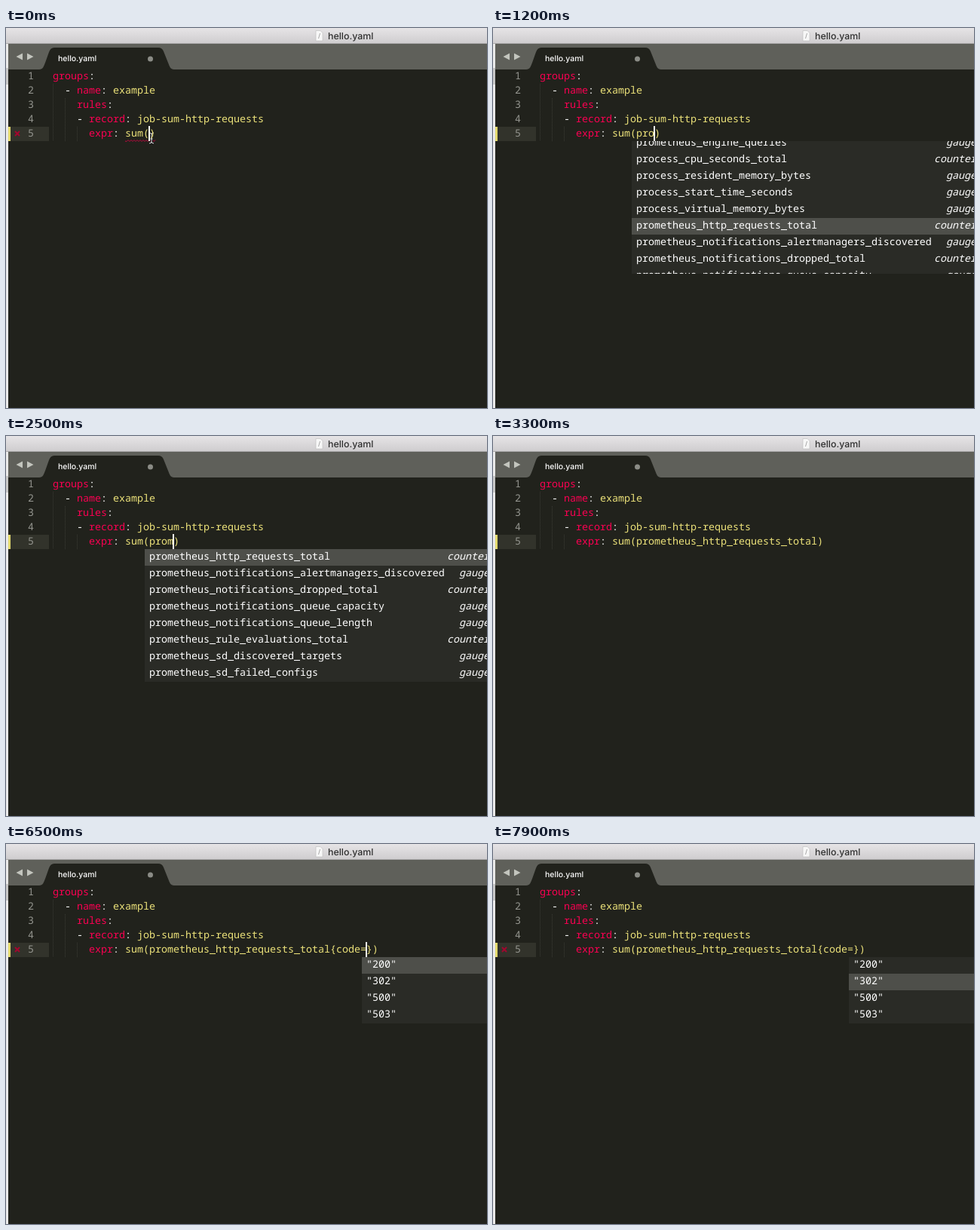
These frames come from a looping animation (638 px wide and 504 px high, 8 s). An HTML page:

```html
<!DOCTYPE html>
<html lang="en">
<head>
<meta charset="utf-8">
<title>hello.yaml</title>
<style>
  html, body { margin: 0; width: 100%; height: 100%; overflow: hidden; background: #21221c; }
  svg { display: block; width: 638px; height: 504px; }
  text { white-space: pre; text-rendering: geometricPrecision; }
  .code { font: 500 13.333px "Noto Sans Mono", "DejaVu Sans Mono", monospace; fill: #ece27a; }
  .ui { font-family: Inter, Roboto, sans-serif; font-weight: 500; }
  .key { fill: #fa0052; }
  .mark, .item { fill: #fff; }
  .num { fill: #94958f; text-anchor: end; }
  .kind { font-style: italic; fill: #fff; text-anchor: end; }
  .guide { stroke: #3a3b34; stroke-dasharray: 1 1; }
</style>
</head>
<body>
<svg viewBox="0 0 638 504">
  <defs>
    <linearGradient id="bar" x2="0" y2="1">
      <stop stop-color="#e6e4e6"/><stop offset="1" stop-color="#cfcdcf"/>
    </linearGradient>
    <clipPath id="clip"><path d="M0 150H638V326H0z"/></clipPath>
  </defs>
  <path fill="#21221c" d="M0 0H638V504H0z"/>
  <path fill="#e9e9e9" d="M0 20H3V504H0z"/>
  <path fill="#c6c6c6" d="M0 53H3V75H0z"/>
  <path fill="#5f605a" d="M3 21H638V55H3z"/>
  <path fill="url(#bar)" d="M0 0H638V20H0z"/>
  <path fill="#a9a8a9" d="M0 20H638V21H0z"/>
  <path fill="#21221c" d="M44 55C49 55 50 51 52 46L57 32Q59 26 64 26H202Q207 26 209 31L215 46C217 51 218 55 223 55z"/>
  <path fill="#c3c5be" d="M22 33.5V42.5L13.5 38zM28 33.5V42.5L36.5 38z"/>
  <circle cx="191.5" cy="41" r="3.5" fill="#8b8c86"/>
  <text class="ui" x="69" y="44" font-size="10.5" fill="#fff">hello.yaml</text>
  <path fill="#f7f7f7" stroke="#bcbcbc" stroke-width=".6" d="M411 3.5H417L420 6.5V17H411z"/>
  <path stroke="#aaa" d="M416.5 7L414.5 14"/>
  <text class="ui" x="427" y="15" font-size="12.4" fill="#303030">hello.yaml</text>
  <path fill="#32332b" d="M6 131H57V150H6z"/>
  <path fill="#e2d96c" d="M3 131H6V150H3z"/>
  <path class="guide" d="M62.5 74V150M78.5 93V150M94.5 131V150"/>
  <g id="lines"></g>
  <g id="live"></g>
</svg>
<script>
const LOOP = 8000, CHAR = 8, ROW = 22, LIST_Y = 150;
const $ = id => document.getElementById(id);
const text = (x, y, cls, s) => `<text class="code ${cls}" x="${x}" y="${y}">${s}</text>`;
const rect = (x, y, w, h, fill) => `<rect x="${x}" y="${y}" width="${w}" height="${h}" fill="${fill}"/>`;
const lineY = n => 49 + 19 * n;

// indent column, dash, key, value
const yaml = [
  [0, '', 'groups', ''],
  [2, '- ', 'name', ' example'],
  [4, '', 'rules', ''],
  [4, '- ', 'record', ' job-sum-http-requests'],
  [6, '', 'expr', ''],
];
$('lines').innerHTML = yaml.map(([col, dash, key, value], i) =>
  text(37, lineY(i + 1), 'num', i + 1) +
  text(62 + col * CHAR, lineY(i + 1), '',
    `<tspan class="mark">${dash}</tspan><tspan class="key">${key}</tspan><tspan class="mark">:</tspan>${value}`)
).join('');

const gauge = name => [name, 'gauge'], counter = name => [name, 'counter'];
const prom = [
  counter('prometheus_http_requests_total'),
  gauge('prometheus_notifications_alertmanagers_discovered'),
  counter('prometheus_notifications_dropped_total'),
  gauge('prometheus_notifications_queue_capacity'),
  gauge('prometheus_notifications_queue_length'),
  counter('prometheus_rule_evaluations_total'),
  gauge('prometheus_sd_discovered_targets'),
  gauge('prometheus_sd_failed_configs'),
];
const pro = [
  gauge('prometheus_engine_queries'),
  counter('process_cpu_seconds_total'),
  gauge('process_resident_memory_bytes'),
  gauge('process_start_time_seconds'),
  gauge('process_virtual_memory_bytes'),
  ...prom.slice(0, 4),
];
const list = (x, items, selected = 0, scroll = 0) => ({ x, items, selected, scroll });
const proList = list(184, pro, 5, 8);
const codeList = list(432, [['code']]);
const values = ['"200"', '"302"', '"500"', '"503"'].map(v => [v]);
const metric = 'sum(prometheus_http_requests_total';

// start time, expression with caret as "|", open completion list
const steps = [
  [0, 'sum(|)'],
  [1000, 'sum(p|)'],
  [1100, 'sum(pr|)', proList],
  [1200, 'sum(pro|)', proList],
  [2100, 'sum(prom|)', list(184, prom)],
  [2600, metric + '|)'],
  [3900, metric + '{|})'],
  [4700, metric + '{c|})', codeList],
  [4800, metric + '{co|})', codeList],
  [4900, metric + '{cod|})', codeList],
  [5300, metric + '{code|})'],
  [6100, metric + '{code=|})', list(472, values)],
  [7400, metric + '{code=|})', list(472, values, 1)],
];
const lastTyping = 6100;

function popup({ x, items, selected, scroll }) {
  const height = Math.min(items.length * ROW - scroll, 8 * ROW);
  const rows = items.map(([name, kind = ''], i) => {
    const y = LIST_Y - scroll + i * ROW;
    return (i === selected ? rect(x, y, 638 - x, ROW, '#4e4f4a') : '') +
      text(x + 6, y + 14, 'item', name) + text(641, y + 14, 'kind', kind);
  });
  return `<g clip-path="url(#clip)">${rect(x, LIST_Y, 638 - x, height, '#2a2b26')}${rows.join('')}</g>`;
}

function squiggle() {
  let d = 'M158 150';
  for (let x = 160; x <= 198; x += 2) d += `L${x} ${x % 4 ? 148.5 : 150.5}`;
  return `<path d="${d}" fill="none" stroke="#c00840"/>`;
}

const beam = 'M190 139Q193 139 193 141Q193 139 196 139M193 141V151M190 153Q193 153 193 151Q193 153 196 153M191.5 147H194.5';
const pointer = `<path d="${beam}" fill="none" stroke="#111" stroke-width="3"/>
  <path d="${beam}" fill="none" stroke="#eee"/>`;
const errorIcon = '<path d="M12 137L18 143M18 137L12 143" stroke="#a3062f" stroke-width="2"/>';

function draw(t) {
  const [start, expr, menu] = steps.findLast(s => s[0] <= t);
  const caret = 158 + expr.indexOf('|') * CHAR;
  const blinkFrom = Math.min(start, lastTyping);
  return (t < 1000 ? squiggle() + pointer : '') +
    text(158, lineY(5), '', expr.replace('|', '')) +
    (t < 1000 || t >= 3900 ? errorIcon : '') +
    (menu ? popup(menu) : '') +
    ((t - blinkFrom) % 1000 < 500 ? rect(caret - 1, 130, 2, 20, '#f8f8f0') : '');
}

let shown = '';
function frame() {
  const next = draw(performance.now() % LOOP);
  if (next !== shown) $('live').innerHTML = shown = next;
  requestAnimationFrame(frame);
}
frame();
</script>
</body>
</html>
```
